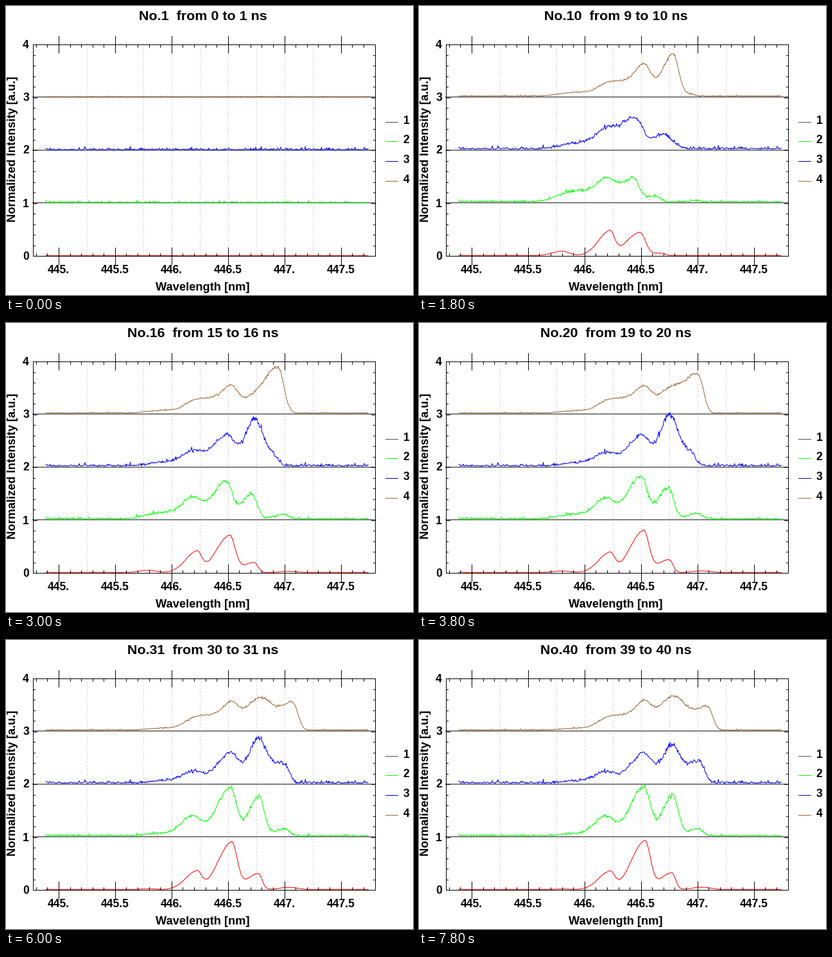
Write a matplotlib script that moves like this. It is 634 px wide and 451 px high and loops after 8000 ms.

```python
import numpy as np
import matplotlib.pyplot as plt
from matplotlib.animation import FuncAnimation

W, H, DPI = 634, 451, 64
PX = 72 / DPI
LEFT, RIGHT, TOP, BOTTOM = 41.5, 574.5, 59.5, 389.5
UNIT = (BOTTOM - TOP) / 4
FRAMES, INTERVAL = 40, 200
ONSET = 9

xs = np.linspace(62, 564, 520)


def peak(k, x0, x1, h0, h1, wl, wr, pulse=0, tau=8):
    """Skewed bump whose place and height relax from (x0, h0) to (x1, h1)."""
    t = max(k - ONSET, 0)
    fade = np.exp(-t / tau)
    u = t / 9
    x = x1 + (x0 - x1) * fade
    h = h1 + (h0 - h1) * fade + pulse * u * np.exp(1 - u)
    d = xs - x
    return h * np.exp(-0.5 * (d / np.where(d < 0, wl, wr)) ** 2)


RED = [
    (222, 222, 7, 1, 15, 12),
    (297, 297, 37, 27, 18, 7.5),
    (344, 352, 36, 76, 21, 8.5),
    (378, 394, 4, 27, 18, 6),
    (440, 440, 0, 4, 15, 15),
]
GREEN = [
    (245, 245, 18, 4, 28, 18),
    (290, 290, 33, 31, 17, 13),
    (333, 351, 37, 77, 22, 9.5),
    (368, 396, 10, 66, 16, 8.5),
    (428, 433, 3, 12, 15, 10),
]
BLUE = [
    (250, 250, 10, 4, 30, 18),
    (290, 290, 27, 17, 17, 15),
    (335, 351, 50, 47, 22, 13),
    (378, 394, 22, 46, 15, 13, 36),
    (402, 440, 4, 40, 18, 9, 0, 14),
]
BROWN = [
    (245, 245, 7, 4, 30, 20),
    (295, 295, 20, 19, 18, 26),
    (335, 335, 15, 16, 22, 22),
    (351, 351, 36, 27, 13, 10, -6),
    (397, 397, 9, 55, 24, 22),
    (396, 451, 58, 30, 16, 8, 14),
]

# peaks, colour, legend colour, floor, spike size, jitter on the signal
CURVES = [
    (RED, "#ff0000", "#5a4c4c", 0.5, 0.12, 0.05),
    (GREEN, "#00ff00", "#00ff00", 1.2, 0.85, 0.22),
    (BLUE, "#0000ff", "#0000a8", 1.4, 1.05, 0.25),
    (BROWN, "#996633", "#996633", 1.6, 0.40, 0.14),
]


def noise(i):
    rng = np.random.default_rng(40 + i)
    spikes = np.minimum(rng.exponential(1, xs.size), 5.5)
    return spikes, rng.normal(0, 1, xs.size)


NOISE = [noise(i) for i in range(len(CURVES))]


def spectrum(i, k):
    peaks, _, _, floor, spike, jitter = CURVES[i]
    on = min(k / ONSET, 1)
    signal = sum(peak(k, *p) for p in peaks) * on ** 0.9
    height = np.maximum(signal, floor * min(1, k / 4))
    spikes, grain = NOISE[i]
    fresh = np.random.default_rng(1000 * i + k).normal(0, 1, xs.size)
    wobble = (0.8 * grain + 0.4 * fresh) * jitter * np.sqrt(signal)
    height = height + spike * (spikes + 0.3 * on * fresh) + wobble
    return BOTTOM - i * UNIT - np.maximum(height, 0)


def wave_x(nm):
    return 81.5 + (nm - 445) * 175.8


fig = plt.figure(figsize=(W / DPI, H / DPI), dpi=DPI, facecolor="white")
ax = fig.add_axes([0, 0, 1, 1])
ax.set_xlim(0, W)
ax.set_ylim(H, 0)
ax.axis("off")


def line(x, y, color="black", width=1, z=4, **kw):
    return ax.plot(x, y, color=color, lw=width * PX, zorder=z, **kw)[0]


def text(x, y, s, size, ha="center", va="baseline", **kw):
    return ax.text(x, y, s, fontsize=size * PX, ha=ha, va=va, color="black",
                   family="Liberation Sans", weight="bold", **kw)


for nm in (445.25, 445.75, 446, 446.25, 446.5, 446.75, 447, 447.25):
    x = np.floor(wave_x(nm)) + 0.5
    line([x, x], [TOP, BOTTOM], "#9a9a9a", z=1, ls=(0, (1, 4)))
for n in (1, 2, 3):
    y = BOTTOM - n * UNIT
    line([LEFT, RIGHT], [y, y], "#808080", 2, z=2)

line([LEFT, RIGHT, RIGHT, LEFT, LEFT], [TOP, TOP, BOTTOM, BOTTOM, TOP])
for n in range(-2, 28):
    x = np.floor(wave_x(445 + n / 10)) + 0.5
    major = n % 5 == 0
    inner, outer = (13, 13) if major else (4, 0)
    line([x, x], [BOTTOM - inner, BOTTOM + outer])
    line([x, x], [TOP - outer, TOP + inner])
    if major:
        text(x, 417, f"{445 + n / 10:.1f}".replace(".0", "."), 17.5)
for n in range(21):
    y = np.floor(BOTTOM - n * UNIT / 5) + 0.5
    size = 6 if n % 5 == 0 else 3
    line([LEFT, LEFT + size], [y, y])
    line([RIGHT - size, RIGHT], [y, y])
    if n % 5 == 0:
        text(36, y + 6, str(n // 5), 17.5, ha="right")

text(306, 444, "Wavelength [nm]", 18.3)
text(10.5, 223.5, "Normalized Intensity [a.u.]", 18.3, va="center", rotation=90)
title = text(306.8, 22, "", 21.4)

plots = []
for i, (_, color, key_color, *_) in enumerate(CURVES):
    plots.append(line(xs, np.full(xs.size, BOTTOM), color, z=3))
    y = 180.5 + int(30.7 * i)
    line([591, 610], [y, y], key_color)
    text(623.5, y + 3.5, str(i + 1), 17.5)


def draw(k):
    title.set_text(f"No.{k + 1}  from {k} to {k + 1} ns")
    for i, plot in enumerate(plots):
        plot.set_ydata(spectrum(i, k) + 0.3)
    return [title, *plots]


anim = FuncAnimation(fig, draw, frames=FRAMES, interval=INTERVAL,
                     repeat=True, repeat_delay=0, blit=False)
plt.show()
```
